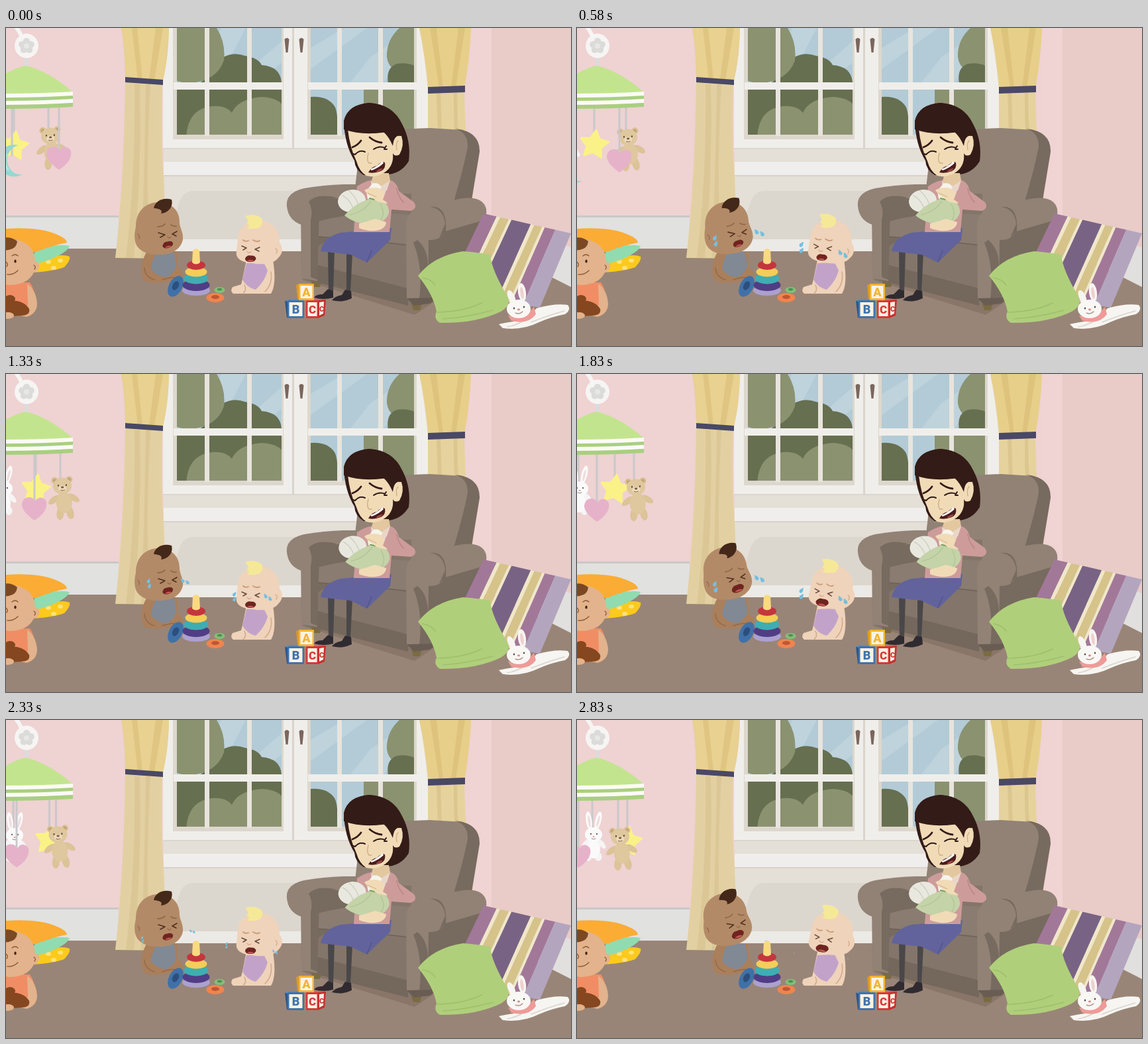
Recreate the animation shown at these times as an HTML page. Size 853 by 480 pixels, loop 2.91 s.

```html
<!DOCTYPE html>
<html lang="en">
<head>
<meta charset="utf-8">
<title>Nursery</title>
<style>
html, body { margin: 0; width: 100%; height: 100%; overflow: hidden; background: #efd2d2; }
svg { display: block; width: 100vw; height: 100vh; }
text { font-family: Roboto, Arial, sans-serif; font-weight: 900; text-anchor: middle; }
</style>
</head>
<body>
<svg id="stage" viewBox="0 0 853 480" preserveAspectRatio="none"></svg>
<script>
const P = (d, fill) => `<path d="${d}" fill="${fill}"/>`;
const E = (x, y, rx, ry, fill, turn = 0) =>
  `<ellipse cx="${x}" cy="${y}" rx="${rx}" ry="${ry}" fill="${fill}" transform="rotate(${turn} ${x} ${y})"/>`;
const R = (x, y, w, h, fill, r = 0) =>
  `<rect x="${x}" y="${y}" width="${w}" height="${h}" rx="${r}" fill="${fill}"/>`;
const L = (d, color, w = 1.5) =>
  `<path d="${d}" fill="none" stroke="${color}" stroke-width="${w}" stroke-linecap="round" stroke-linejoin="round"/>`;
const G = (id, inner) => `<g id="${id}">${inner}</g>`;

function room() {
  return R(0, 0, 853, 480, '#efd2d2') + R(733, 0, 120, 345, '#e9cbc8') + R(700, 0, 33, 345, '#f0d3d3')
    + R(0, 333, 853, 147, '#998577') + R(0, 284, 170, 49, '#e1e1df') + R(0, 283, 170, 3, '#cac8c8')
    + P('M733 290L853 331V391L733 330Z', '#e1e0de')
    + R(238, 182, 402, 155, '#e4dfd7') + R(238, 202, 300, 20, '#f0eeec') + R(238, 222, 300, 2, '#d8d2ca')
    + P('M280 246H445V319H262Q246 318 251 297L262 262Q268 247 280 246Z', '#dcd7ce')
    + R(238, 319, 210, 18, '#eceae6');
}

function sashes() {
  const bush = '#8b9270', dark = '#666f50', frame = '#f0eeea';
  let s = R(237, 0, 400, 183, frame) + R(252, 0, 167, 168, '#ddd7cd') + R(455, 0, 165, 168, '#ddd7cd')
    + '<clipPath id="glass"><path d="M258 0H416V161H258ZM460 0H616V161H460Z"/></clipPath><g clip-path="url(#glass)">'
    + R(250, 0, 380, 170, '#b2cbd6')
    + P('M325 0H362L330 62H296ZM416 20V52L380 82H345ZM460 30L510 0H545L460 62ZM550 44L616 0V28L570 82H520Z', '#bed3dc')
    + P('M290 170V84Q304 78 311 58Q334 32 361 42Q381 45 386 56Q414 58 416 82V170Z', dark)
    + R(258, 88, 40, 80, dark)
    + P('M250 0H318Q332 22 329 49Q318 80 278 83Q262 83 250 76Z', bush)
    + P('M272 170Q272 126 305 119Q330 114 341 128Q350 107 386 104Q412 105 420 120V170Z', bush)
    + P('M460 170V104Q485 102 496 118Q502 128 501 170Z', dark)
    + P('M540 170V93H620V170Z', bush)
    + P('M620 0H594Q574 18 575 44Q578 70 620 75Z', bush)
    + P('M577 84Q573 60 590 54Q608 51 620 59V84Z', dark) + '</g>';
  for (const x of [300, 364, 500, 562]) s += R(x, 0, 7, 163, '#e8e4dd');
  s += R(253, 82, 165, 11, frame) + R(456, 82, 164, 11, frame) + R(432, 0, 3, 183, '#d9d4cd');
  for (const x of [424, 446]) s += P(`M${x - 3.5} 17Q${x} 13 ${x + 3.5} 17L${x + 1.5} 37H${x - 1.5}Z`, '#7a665e');
  return s + R(237, 181, 400, 2, '#dcd6ce');
}

function curtains() {
  return P('M174 0H246Q245 50 236 80Q233 160 238 225L243 348L165 347Q178 230 180 78Q179 30 174 0Z', '#e3d0a2')
    + P('M174 0H246Q245 45 237 80H181Q180 30 174 0Z', '#e8d191')
    + P('M190 0L199 78H206L198 0ZM226 0L216 78H224L237 0Z', '#dfc581')
    + P('M194 85Q196 220 181 347H193Q205 220 202 85ZM218 85Q211 220 216 300L209 347H204Q209 220 211 85Z', '#dbc796')
    + P('M180 74L237 78V86L180 82Z', '#494866')
    + P('M624 0H702Q700 50 692 91Q693 190 706 262H637V92Q632 40 624 0Z', '#e6d29c')
    + P('M624 0H702Q700 45 692 91H638Q634 40 624 0Z', '#e7cf8a')
    + P('M640 0L654 90H660L650 0ZM683 0L672 90H679L693 0Z', '#dec37d')
    + P('M650 98L652 160H658L656 98ZM676 98Q675 190 690 262H695Q681 180 681 98Z', '#dcc690')
    + P('M637 89L693 87V97L637 99Z', '#494866');
}

function mobileTop() {
  let s = L('M14 -3Q20 4 24 14', '#f6f5f4', 6) + R(28, 43, 6, 16, '#dcdbdb') + E(31, 27, 18, 18.5, '#f6f5f3');
  for (let i = 0; i < 5; i++) {
    const a = i * 1.2566 - 1.57;
    s += E(31 + 7 * Math.cos(a), 27 + 7 * Math.sin(a), 5.2, 5.2, '#dbdbda');
  }
  const band = (y, h, color) => P(`M-2 ${y + 2}Q52 ${y + 2} 101 ${y - 1}V${y + h - 1}Q52 ${y + h + 2} -2 ${y + h + 2}Z`, color);
  return s + E(31, 27, 4, 4, '#e7e7e6') + P('M-2 70Q18 58 31 57Q66 66 101 97V104Q50 108 -2 107Z', '#c3e48f')
    + band(97, 7, '#fbfbf6') + band(103, 6, '#a9cf80') + band(108, 6, '#fbfbf6') + band(114, 6, '#a9cf80');
}

const star = Array.from({ length: 10 }, (_, i) => {
  const a = i * Math.PI / 5 - Math.PI / 2, r = i % 2 ? 11.5 : 22;
  return `${(r * Math.cos(a)).toFixed(1)} ${(r * Math.sin(a)).toFixed(1)}`;
}).join('L');

const toyArt = {
  star: `<path d="M${star}Z" fill="#faf287" stroke="#faf287" stroke-width="3" stroke-linejoin="round" transform="rotate(8)"/>`,
  bunny: E(-7, -27, 4.5, 14, '#fbfafa', -8) + E(7, -27, 4.5, 14, '#fbfafa', 14) + E(-6.5, -26, 1.8, 9, '#efdede', -8) + E(7, -26, 1.8, 9, '#efdede', 14)
    + E(-8, 27, 5.5, 7, '#f6f4f4', 12) + E(7, 27, 5.5, 7, '#f6f4f4', -12) + E(0, 15, 10, 15, '#fbfafa')
    + E(-12, 8, 4, 9, '#f6f4f4', 40) + E(12, 8, 4, 9, '#f6f4f4', -40) + E(0, -6, 13, 11, '#fbfafa')
    + E(-4, -7, 1, 1.2, '#555') + E(5, -7, 1, 1.2, '#555') + E(0, -3, 1.5, 1, '#d99') + L('M-3 0Q0 2 3 0', '#888', 1),
  bear: '<g transform="rotate(-4)">' + E(-11, -9, 5, 5, '#d9be92') + E(11, -9, 5, 5, '#d9be92') + E(-11, -9, 2.5, 2.5, '#c3a474') + E(11, -9, 2.5, 2.5, '#c3a474')
    + E(-14, 20, 4.5, 10, '#dcc398', 55) + E(16, 19, 4.5, 10, '#dcc398', -55) + E(-6, 41, 5.5, 10, '#dcc398', 8) + E(9, 41, 5.5, 10, '#dcc398', -10)
    + E(1, 25, 12, 16, '#dfc79e') + E(0, 0, 14, 12.5, '#dfc79e') + E(0, 4, 6, 4.5, '#ecdcbd')
    + E(-6, -1, 1.1, 1.3, '#564331') + E(6, -1, 1.1, 1.3, '#564331') + E(0, 2, 2.2, 1.5, '#7d5b41') + L('M-3 6Q0 8 3 6', '#8d6c4a', 1) + '</g>',
  moon: P('M10 -24A25 24 0 1 0 16 20A20 22 0 0 1 10 -24Z', '#94d8d2') + L('M-8 -10Q-13 1 -6 13', '#b4e6e1', 3),
  heart: P('M0 18Q-20 4 -19 -7Q-17 -18 -7 -17Q-1 -16 1 -10Q5 -18 12 -16Q20 -13 18 -3Q15 9 0 18Z', '#e6b2ca')
};
const hangs = { star: 0, bunny: -2, bear: -3, moon: 0, heart: 0 };

function toys() {
  return Object.keys(toyArt).map(k => G(k, `<path id="${k}Line" stroke="#c9c8cb" stroke-width="3"/>` + toyArt[k])).join('');
}

function leftCorner() {
  const skin = '#e2b38c';
  return P('M35 369L48 352Q80 339 96 345Q98 350 88 361Q68 368 35 369Z', '#fcca1c')
    + [[64, 353], [82, 351], [72, 362]].map(c => E(c[0], c[1], 4, 3, '#fde27c')).join('')
    + P('M35 357L45 335Q75 325 96 329Q93 338 70 348Q54 355 35 357Z', '#91dbb0')
    + P('M-2 303Q45 300 70 309Q92 317 92 324Q70 328 48 337L-2 347Z', '#fbac34')
    + P('M-5 384H36Q46 398 43 422L30 431H-5Z', '#f18d65')
    + P('M32 386Q46 396 47 417Q46 432 31 436L18 433L33 418Z', skin)
    + P('M-5 320Q15 314 34 328Q44 338 44 352Q53 355 49 364Q46 369 42 369Q33 388 4 388L-5 386Z', skin)
    + P('M-5 317Q8 314 17 322Q16 333 4 335L-5 336Z', '#7a4822')
    + E(14, 352, 1.7, 2.6, '#3c2518') + L('M9 344Q14 340 18 344M0 353Q4 357 1 360M2 372Q11 373 18 366M42 358Q46 360 43 364', '#8a5732', 1.3)
    + E(6, 409, 8, 6, '#85471f') + P('M-5 412Q26 408 35 424Q37 434 23 434L-5 436Z', '#85471f') + E(3, 434, 9, 5, skin);
}

function cryMouth(id, x, y, turn) {
  return `<g transform="translate(${x} ${y}) rotate(${turn})">` + G(id, P('M-8 1Q-6 -5 0 -4.5Q7 -6 8.5 -1Q7 5 0 5Q-7 6 -8 1Z', '#6f2420')
    + P('M-5 4Q0 0 6 3Q3 5 -5 4Z', '#c45a53')) + '</g>';
}

function darkBaby() {
  const skin = '#b38a67', shade = '#94694a';
  return P('M212 338Q199 363 208 381Q223 388 250 381L265 380Q270 368 259 361V338Z', '#a97f5c')
    + P('M227 338Q219 356 219 364Q228 376 243 376Q250 372 257 362Q257 348 253 338Z', '#818995')
    + L('M209 362Q210 376 224 380M236 380Q250 375 259 377', shade)
    + G('darkHead', P('M196 300C196 276 211 263 231 263C250 263 262 276 262 293C262 302 268 308 267 319C265 332 252 342 234 342C215 343 198 337 195 322C193 312 195 306 196 300Z', skin)
      + P('M223 272C225 260 239 255 250 259C253 270 245 279 234 280Q238 273 223 272Z', '#442819')
      + L('M229 300Q236 300 240 296M249 297Q253 300 257 299', shade, 1.8)
      + L('M230 309L240 312L233 316M258 307L251 311L257 314', '#50301e', 1.6)
      + L('M244 315Q247 319 249 315M199 311Q202 313 201 318', shade, 1.3)
      + cryMouth('darkMouth', 244, 327, -8));
}

function lightBaby() {
  const skin = '#efd3ba', shade = '#d3a98a';
  return P('M363 350Q357 380 355 387L342 391Q338 397 343 401H400Q409 387 403 350Z', skin)
    + P('M363 355Q359 372 357 380Q364 392 377 395Q391 382 395 366L389 354Z', '#c3a2ca')
    + L('M400 368Q403 386 391 398M360 388Q364 395 358 401', shade)
    + G('lightHead', P('M350 318C351 300 365 291 382 291C402 291 413 304 413 324C419 331 418 341 411 347C405 356 386 358 371 355C356 354 346 348 348 337C349 330 349 324 350 318Z', skin)
      + P('M361 284Q374 279 386 287Q390 294 383 301Q373 305 363 302Q371 299 363 295Q369 292 361 284Z', '#f5e998')
      + L('M358 320Q361 323 366 321M373 320Q379 324 383 321', '#c79a78', 1.8)
      + L('M356 329L363 332L358 335M383 331L376 334L382 337', '#67483a', 1.5)
      + L('M364 337Q366 341 370 338M407 333Q411 336 408 340', shade, 1.3)
      + cryMouth('lightMouth', 369, 348, 8));
}

const ring = (x, y, rx, ry, color, hole, turn) => E(x, y, rx, ry, color, turn) + E(x, y - 1, rx * .45, ry * .42, hole, turn);

function floorToys() {
  let s = ring(256, 390, 10, 17, '#3f71a8', '#2c4f7c', 28);
  const rings = [[396, 21, 8, '#aca0ce'], [388, 20.5, 9, '#503d85'], [378, 18.5, 8.5, '#3fadb2'], [368, 16.5, 7.5, '#f5cd58'], [358, 14, 7, '#c5353d']];
  for (const [y, rx, ry, c] of rings) s += E(287, y, rx, ry, c);
  return s + P('M282 336Q287 330 292 336L293 354Q287 359 281 354Z', '#f9da80')
    + ring(316, 407, 13.5, 7, '#f0844f', '#bd5834', 0) + ring(322.5, 395.5, 8, 4.5, '#82bf78', '#4e8e56', 0);
}

const face = (x, y, w, h, letter, color, size) => R(x, y, w, h, color, 1) + R(x + 2.5, y + 3, w - 5, h - 6, '#faf3e4')
  + `<text x="${x + w / 2}" y="${y + h / 2 + size * .36}" font-size="${size}" fill="${color}">${letter}</text>`;

function blocks() {
  return P('M421 412L427 410V438L424 437Z', '#2e578a') + P('M421 412L428 409H448L450 413H426Z', '#5a8dc2')
    + face(425, 411, 25, 27, 'B', '#3e73ac', 18)
    + P('M453 412L459 409H480L483 412Z', '#e4605f') + face(453, 411, 19, 27, 'C', '#d9373a', 17)
    + P('M471 411L483 410L481 434L471 438Z', '#c7302f') + P('M473 414L480 413L479 431L473 434Z', '#faf3e4')
    + '<text x="476.5" y="428" font-size="11" fill="#c7302f">C</text>'
    + P('M438 388L444 386V411L440 409Z', '#dc9a23') + face(442, 386, 23, 25, 'A', '#f1b532', 18);
}

function chair() {
  const mid = '#918275', dark = '#776a5f', deep = '#695d53';
  return P('M446 380L617 433L654 408L500 365Z', '#897669')
    + P('M459 374H479L474 391H463ZM609 407H630L625 426H615Z', '#7b6b43')
    + P('M526 250L536 164Q580 152 640 151L690 154Q704 160 698 185L678 265L636 310H520Z', mid)
    + P('M678 152Q716 156 715 187L703 260L675 265Q690 215 697 180Q698 158 678 152Z', dark)
    + P('M445 262L506 250H612V418L446 378Z', '#83756a') + P('M470 262L527 250L524 295L470 330Z', dark)
    + P('M470 292Q530 275 612 282V326Q540 322 470 314Z', '#8a7c70') + L('M470 315Q535 319 607 328', deep, 1.2)
    + P('M460 355L607 393V419L450 379Z', '#74675c')
    + P('M424 269Q422 248 450 242Q490 235 534 236L526 259Q490 254 475 262Q466 270 470 290V382L446 378V297Q426 290 424 269Z', mid)
    + P('M457 262Q470 249 499 256Q477 261 473 276L470 380L460 376V290Q464 275 457 262Z', dark)
    + P('M630 292L719 264L724 290L706 322L692 340L652 410L617 419V320Z', dark)
    + P('M604 300Q603 275 634 267L690 257Q720 254 725 273Q727 286 718 291L663 307Q656 321 638 320L637 408L605 409Z', mid)
    + P('M663 296Q661 273 640 270Q667 267 664 307L654 317Z', dark)
    + P('M621 320Q637 333 637 360V408L624 409Q630 360 615 324Z', dark)
    + P('M605 408L652 407L640 416L616 419Z', deep);
}

function mother() {
  const skin = '#f1dbb7', hair = '#331b17', knit = '#cd9c9a';
  return P('M486 336H496L494 398H487ZM514 340H523L520 398H514Z', '#4a4749')
    + P('M486 394L494 397V407Q480 411 465 407Q468 402 478 402ZM512 395L521 397L522 408Q508 415 492 411Q496 405 507 403Z', '#302b30')
    + P('M475 337Q478 316 505 309L582 302L580 320L545 354L520 342Z', '#62639c') + L('M545 353L552 336', '#52538a', 1.4)
    + P('M510 140Q516 115 549 113Q584 115 598 145Q612 171 608 201Q594 224 566 221L540 222Q527 214 526 200Q511 176 510 140Z', hair)
    + P('M530 239Q545 229 557 229H577Q590 231 593 246L616 263Q622 272 611 276L582 274L579 308H525Z', knit)
    + P('M555 219H578L580 230L566 240L552 231Z', '#e3c79f') + P('M551 231L566 239L580 230L570 260H553Z', '#ead6c8')
    + P('M516 153Q543 162 577 157Q583 162 584 172Q588 160 597 163Q602 177 594 191Q587 195 584 189Q586 207 573 217Q559 227 544 223Q533 216 529 201Q519 180 516 153Z', skin)
    + P('M510 153Q508 117 549 113Q592 118 596 163Q586 160 584 178Q578 164 570 157Q540 163 510 153Z', hair)
    + L('M592 170Q588 174 590 184', '#cfae83', 1.3)
    + L('M523 180Q531 177 536 170M549 165Q557 172 567 173', hair, 2.8)
    + L('M527 191Q534 183 542 187M555 183Q564 177 572 181M572 181L574 178M571 183L575 183M527 191L524 190', '#2c1b18', 2)
    + L('M547 189Q544 200 548 204H552', '#cfae83', 1.4)
    + P('M547 218Q552 209 560 208Q567 200 572 203Q574 212 566 216Q556 220 547 218Z', '#4c1c1d')
    + P('M550 213Q561 209 568 201L570 204Q563 211 552 215Z', '#fff') + P('M558 217Q563 212 569 212Q564 218 558 217Z', '#a64a47')
    + G('bundle', E(522, 261, 21, 17, '#e9e8df', -8) + L('M508 253Q520 259 525 275M518 246Q529 255 533 270', '#cfcfc4', 1.5)
      + P('M511 283Q530 261 555 257Q579 260 578 279Q573 295 551 296Q527 296 511 283Z', '#c4d3a8')
      + L('M520 282Q541 277 551 261M566 290Q573 280 565 266', '#b3c596', 1.4)
      + P('M544 246L553 235Q562 232 567 240L555 257L546 258Z', '#f5f4eb') + L('M549 257L556 259L560 253', '#73a356', 2))
    + P('M541 245Q550 239 564 242L579 257L575 265L561 262L547 252Z', skin) + L('M546 249L559 255', '#cfae83', 1)
    + P('M574 245L604 267L589 273L569 259Z', knit) + L('M590 242Q591 253 600 263', '#b98280', 1.4)
    + P('M533 295Q546 292 557 288L574 293Q573 304 558 306Q544 307 533 302Z', skin);
}

function pillows() {
  const cream = '#f0e7ca', gold = '#d6c38a', mauve = '#a27899';
  const bands = [[0, .15, mauve], [.15, .19, cream], [.19, .29, gold], [.29, .32, cream], [.32, .54, '#796384'],
    [.54, .58, cream], [.58, .67, gold], [.67, .7, cream], [.7, .82, mauve], [.82, 1, '#b4a5bf']];
  const top = t => `${721 + 132 * t} ${280 + 30 * t}`, low = t => `${664 + 142 * t} ${398 + 24 * t}`;
  return bands.map(([a, b, c]) => P(`M${top(a)}L${top(b)}L${low(b)}L${low(a)}Z`, c)).join('')
    + P('M622 374Q645 344 690 337Q714 339 731 342Q733 365 757 405Q764 418 747 428Q710 446 655 445Q645 439 650 428Q645 402 622 374Z', '#b0cf7b')
    + L('M651 429Q692 428 718 415M660 439Q695 437 735 426M629 377Q642 379 648 388', '#9fbf6d', 1.6)
    + P('M744 447Q764 443 785 440L801 423Q829 415 848 418Q854 425 844 432Q823 436 805 444Q779 457 750 453Z', '#f7f5f1')
    + L('M793 444Q815 435 843 427M757 451Q770 449 783 441', '#d9d3cf', 1.5)
    + P('M758 434Q782 440 797 421L800 432Q789 448 763 442Z', '#ee9b98')
    + E(763, 406, 5, 11, '#f7f5f1', -24) + E(779, 399, 6, 14, '#f7f5f1', -8) + E(779, 400, 2.5, 9, '#edd1ce', -8)
    + E(774, 424, 18, 14, '#f9f7f4') + E(767, 423, 1.2, 1.6, '#51433f') + E(782, 421, 1.2, 1.6, '#51433f') + E(774, 425, 2, 1.4, '#dc8583') + L('M769 430Q775 433 780 428', '#9f7f79', 1.1);
}

// each tear: its tilt, then its place on steps 1 to 4 of the fall
const tears = [
  [25, [216, 316], [209, 321], [206, 331], [205, 344]], [-35, [270, 313], [275, 309], [281, 319], [285, 333]],
  [35, [345, 336], [339, 331], [333, 340], [328, 352]], [-25, [395, 337], [401, 341], [406, 350], [409, 360]]
];
const drop = (x, y, s) => P(`M${x} ${y - 6 * s}Q${x + 5 * s} ${y + 1 * s} ${x + 2 * s} ${y + 4 * s}Q${x - 3 * s} ${y + 5 * s} ${x - 3 * s} ${y}Z`, '#74c0df');

const stage = document.getElementById('stage');
stage.innerHTML = room() + sashes() + curtains() + toys() + mobileTop() + leftCorner()
  + chair() + mother() + darkBaby() + lightBaby() + floorToys() + blocks() + pillows()
  + tears.map((_, i) => G('tear' + i, drop(-2.5, -3, .85) + drop(2.5, 4, .85))).join('');

const el = {};
stage.querySelectorAll('[id]').forEach(e => el[e.id] = e);
const move = (id, v) => el[id].setAttribute('transform', v);

const marks = [0, 7, 16, 22, 25, 31, 34];
const paths = {
  star: [[12, 26, 45, 57, 60, 71, 76], [178, 176, 174, 174, 177, 187, 183]],
  bunny: [[-25, -14, -3, 4, 8, 18, 25], [179, 179, 179, 179, 180, 180, 179]],
  bear: [[67, 77, 85, 89, 84, 73, 65], [163, 165, 169, 171, 172, 174, 176]],
  moon: [[9, -8, -24, -30, -32, -36, -38], [201, 211, 214, 215, 215, 215, 215]],
  heart: [[80, 64, 43, 30, 22, 10, 2], [196, 200, 203, 205, 205, 204, 205]]
};

function along(list, n) {
  let i = 0;
  while (i < marks.length - 2 && n > marks[i + 1]) i++;
  return list[i] + (list[i + 1] - list[i]) * (n - marks[i]) / (marks[i + 1] - marks[i]);
}

function draw(n) {
  for (const k in paths) {
    const x = along(paths[k][0], n), y = along(paths[k][1], n);
    move(k, `translate(${x} ${y})`);
    el[k + 'Line'].setAttribute('d', `M${hangs[k]} ${118 - y}V-8`);
  }
  const sob = [0, 1, .95, .5][n % 4], wide = [1, 1.12, 1.18, 1][n % 4];
  move('darkHead', `translate(${sob} ${-3 * sob}) rotate(${-8 * sob} 238 345)`);
  move('lightHead', `translate(0 ${-2 * sob}) rotate(${7 * sob} 383 355)`);
  move('darkMouth', `scale(${wide})`);
  move('lightMouth', `scale(${wide})`);
  const sway = Math.max(0, Math.sin((n - 9) / 22 * Math.PI));
  move('bundle', `translate(${1.5 * sway} ${.5 * sway})`);
  const step = n % 5, size = [0, .9, 1.05, .6, .18][step];
  tears.forEach((t, i) => {
    move('tear' + i, step ? `translate(${t[step]}) rotate(${t[0]}) scale(${size})` : 'scale(0)');
  });
}

const LOOP = 2910, FPS = 12;
function tick() {
  const t = performance.now() % LOOP;
  draw(Math.min(34, Math.floor((t + 3.4) * FPS / 1000)));
  requestAnimationFrame(tick);
}
tick();
</script>
</body>
</html>
```
